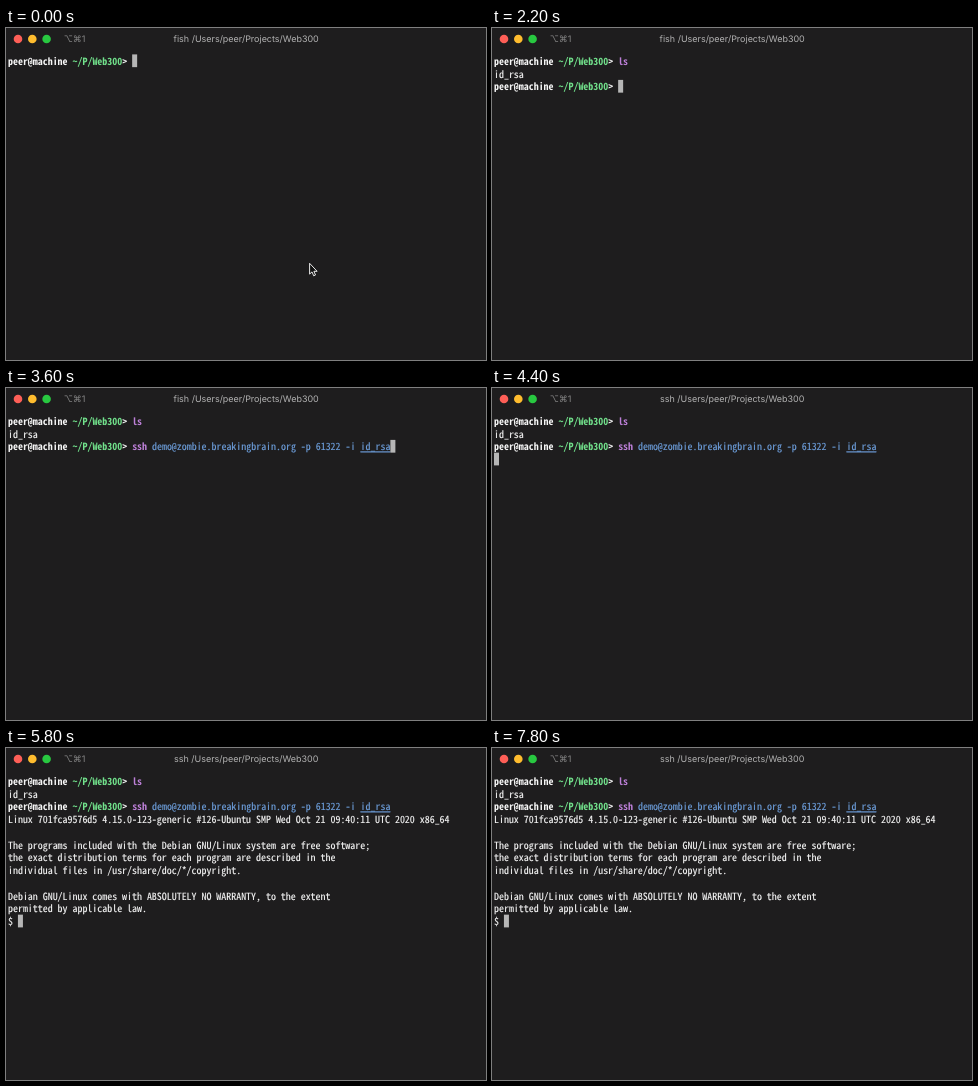
Recreate the animation shown at these times as an HTML page. Size 480 px wide and 332 px high, loop 8000 ms.

```html
<!DOCTYPE html>
<html lang="en">
<head>
<meta charset="utf-8">
<title>Terminal session</title>
<style>
  html, body { margin: 0; width: 100%; height: 100%; overflow: hidden; background: #1e1d1e; }
  svg { display: block; width: 480px; height: 332px; text-rendering: geometricPrecision; }
  text { white-space: pre; fill: currentColor; }
  .bar { font: 8.97px Inter, "DejaVu Sans", sans-serif; color: #b2b2b2; }
  .hint { color: #868686; }
  #screen text { stroke: currentColor; stroke-width: .15px; }
  #screen .strong { font-weight: 700; stroke: none; }
  .plain { color: #f6f6f6; }
  .path { color: #72e28c; }
  .command { color: #bd80d8; }
  .error { color: #cb4f33; }
  .argument { color: #6d9edb; }
  .file { color: #6d9edb; text-decoration: underline .6px #55799f; }
  .ghost { color: #858585; }
</style>
</head>
<body>
<svg viewBox="0 0 480 332">
  <circle cx="12" cy="11" r="4.3" fill="#fe5f57"/>
  <circle cx="26.3" cy="11" r="4.3" fill="#febc2e"/>
  <circle cx="40.6" cy="11" r="4.3" fill="#28c840"/>
  <g class="bar">
    <text class="hint" x="57.7" y="14.3">⌥⌘1</text>
    <text id="title" x="240.2" y="14.3" text-anchor="middle"></text>
  </g>
  <g id="screen"></g>
  <rect id="cursor" width="5" height="12.75" fill="#b6b6b6"/>
  <path id="pointer" d="M303.6 235.3v10.8l2.4-2.2 1.7 3.9 1.8-.8-1.6-3.7h3.2z"
        fill="#111" stroke="#fff" stroke-width=".9" stroke-linejoin="round"/>
</svg>
<script>
const LOOP = 8000, CELL = 4.966, ROW = 12.75, LEFT = 2, TOP = 26.4, BASELINE = 10.5;
const FAMILY = '"Noto Sans Mono CJK JP", "Noto Sans Mono CJK SC", "Noto Sans Mono", monospace';

// Moments of the session in ms
const T = { firstKey: 400, ls: 600, listed: 2000, s: 2400, ss: 2800, ssh: 3000,
            accepted: 3400, connecting: 4400, welcome: 5800 };

const byId = id => document.getElementById(id);
const screen = byId('screen'), cursor = byId('cursor'), pointer = byId('pointer'), title = byId('title');
const timed = [];

// Pick the type size whose character advance equals one cell
const pen = document.createElement('canvas').getContext('2d');
pen.font = `100px ${FAMILY}`;
screen.style.fontFamily = FAMILY;
screen.style.fontSize = `${CELL * 100 / pen.measureText('0').width}px`;

const cellX = col => LEFT + col * CELL;
const rowY = row => TOP + row * ROW;

function put(row, col, text, style, from = 0, to = LOOP) {
  const node = document.createElementNS('http://www.w3.org/2000/svg', 'text');
  node.setAttribute('x', cellX(col));
  node.setAttribute('y', rowY(row) + BASELINE);
  node.setAttribute('class', style);
  node.textContent = text;
  screen.append(node);
  timed.push({ node, from, to });
}

function prompt(row, from) {
  put(row, 0, 'peer@machine', 'plain strong', from);
  put(row, 13, '~/P/Web300', 'path strong', from);
  put(row, 23, '>', 'plain strong', from);
}

const INPUT = 25;
const remote = 'demo@zombie.breakingbrain.org -p 61322 -i ', key = 'id_rsa';
const line = 'ssh ' + remote + key;

prompt(0, 0);
put(0, INPUT, 'l', 'error', T.firstKey, T.ls);
put(0, INPUT, 'ls', 'command strong', T.ls);
put(1, 0, key, 'plain', T.listed);
prompt(2, T.listed);

function partial(count, style, from, to) {
  put(2, INPUT, line.slice(0, count), style, from, to);
  put(2, INPUT + count, line.slice(count), 'ghost', from, to);
}
partial(1, 'error', T.s, T.ss);
partial(2, 'error', T.ss, T.ssh);
partial(3, 'command strong', T.ssh, T.accepted);

put(2, INPUT, 'ssh', 'command strong', T.accepted);
put(2, INPUT + 4, remote, 'argument', T.accepted);
put(2, INPUT + 4 + remote.length, key, 'file', T.accepted);

[
  'Linux 701fca9576d5 4.15.0-123-generic #126-Ubuntu SMP Wed Oct 21 09:40:11 UTC 2020 x86_64',
  '',
  'The programs included with the Debian GNU/Linux system are free software;',
  'the exact distribution terms for each program are described in the',
  'individual files in /usr/share/doc/*/copyright.',
  '',
  'Debian GNU/Linux comes with ABSOLUTELY NO WARRANTY, to the extent',
  'permitted by applicable law.',
  '$'
].forEach((text, i) => put(3 + i, 0, text, 'plain', T.welcome));

// [time, row, column]
const stops = [
  [0, 0, INPUT], [T.firstKey, 0, INPUT + 1], [T.ls, 0, INPUT + 2],
  [T.listed, 2, INPUT], [T.s, 2, INPUT + 1], [T.ss, 2, INPUT + 2], [T.ssh, 2, INPUT + 3],
  [T.accepted, 2, INPUT + line.length], [T.connecting, 3, 0], [T.welcome, 11, 2]
];

const show = (node, on) => node.setAttribute('visibility', on ? 'visible' : 'hidden');

function draw() {
  const now = performance.now() % LOOP;
  timed.forEach(({ node, from, to }) => show(node, now >= from && now < to));
  const [, row, col] = stops.findLast(([time]) => now >= time);
  cursor.setAttribute('x', cellX(col));
  cursor.setAttribute('y', rowY(row));
  show(pointer, now < T.firstKey);
  title.textContent = `${now < T.connecting ? 'fish' : 'ssh'} /Users/peer/Projects/Web300`;
  requestAnimationFrame(draw);
}
draw();
</script>
</body>
</html>
```
